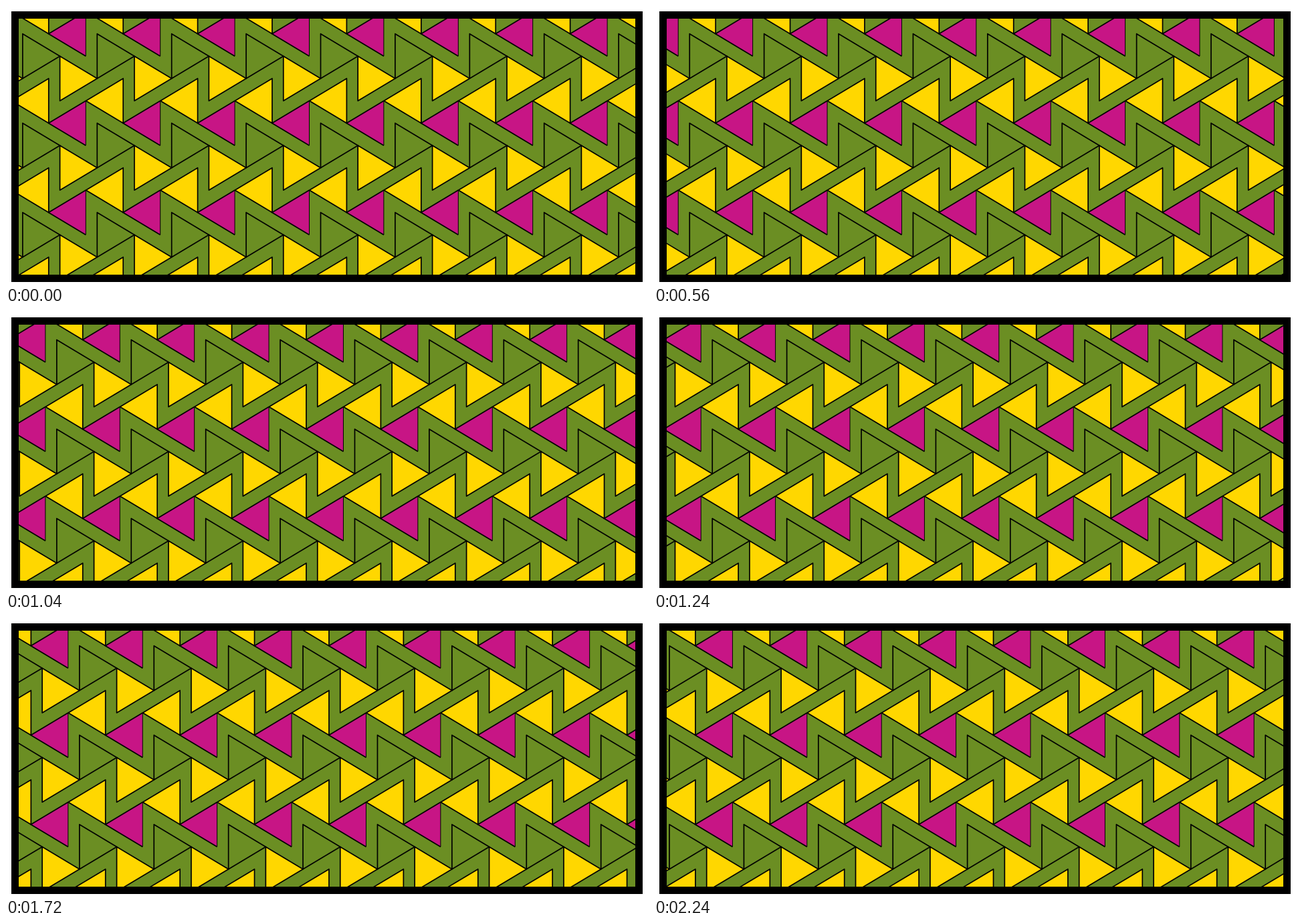
These frames come from a looping animation (960x417 px, 2280 ms). An HTML page with a canvas:

```html
<!DOCTYPE html>
<html>
<head>
<meta charset="utf-8">
<style>
html, body { margin: 0; width: 960px; height: 417px; overflow: hidden; background: #fff; }
canvas { display: block; }
</style>
</head>
<body>
<canvas id="stage" width="960" height="417"></canvas>
<script>
const ctx = document.getElementById('stage').getContext('2d');
const W = 111.4, H = 134;      // size of one repeating tile
const U = W / 2, V = H / 4;    // width and half height of a triangle
const STEPS = 59, FRAMES = 57, FRAME_MS = 40;
const GREEN = '#6b8e23', GOLD = '#ffd700', PINK = '#c71585';

function trace(points, color, width, closed) {
  ctx.beginPath();
  points.forEach(p => ctx.lineTo(...p));
  if (closed) ctx.closePath();
  if (color) {
    ctx.fillStyle = color;
    ctx.fill();
  }
  ctx.lineWidth = width;
  ctx.stroke();
}

const right = (x, y) => [[x, y], [x + U, y + V], [x, y + 2 * V]];
const left = (x, y) => [[x, y], [x - U, y + V], [x, y + 2 * V]];

function tile(x, y) {
  const pink = left(x + 94.4, y + 3 * V);
  trace(pink, PINK, 1.7, false);
  trace([pink[0], pink[2]], null, 1, false);
  trace(right(x, y), GREEN, 1.7, true);
  trace(right(x + U, y + V), GOLD, 1.7, true);
  trace(left(x + 38.9, y + 2 * V), GOLD, 1.7, true);
}

function draw(now) {
  const frame = Math.floor(now / FRAME_MS) % FRAMES;
  // the drift skips one step twice per loop
  const step = frame + Math.ceil(frame * 2 / FRAMES);
  const shift = step * W / STEPS;

  ctx.fillStyle = '#000';
  ctx.fillRect(8, 8, 944, 406);
  ctx.save();
  ctx.beginPath();
  ctx.rect(19, 19, 922, 384);
  ctx.clip();
  ctx.fillStyle = GREEN;
  ctx.fillRect(19, 19, 922, 384);
  ctx.strokeStyle = '#000';
  ctx.lineJoin = 'round';
  for (let j = -2; j < 3; j++)
    for (let i = -2; i < 9; i++)
      tile(24.9 + shift + i * W, 41.7 + j * H);
  ctx.restore();
}

const start = performance.now();
function loop() {
  draw(performance.now() - start);
  requestAnimationFrame(loop);
}
loop();
</script>
</body>
</html>
```
